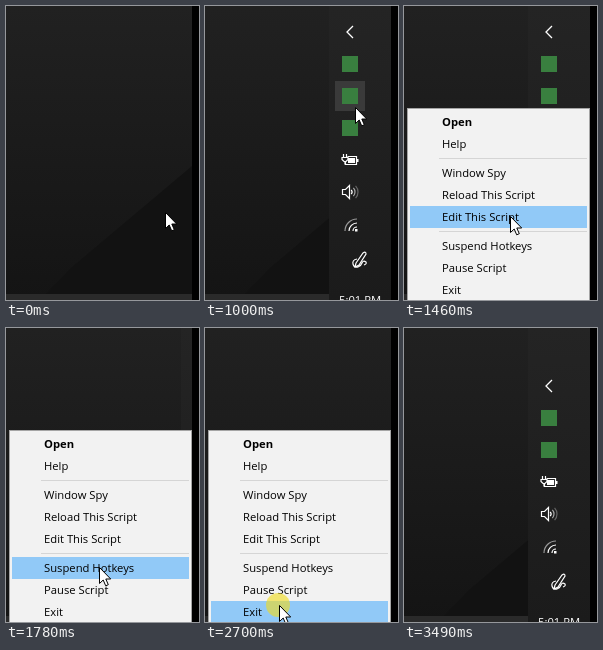
These frames come from a looping animation (193 px wide and 294 px high, 4.65 s). An HTML page with a canvas:

```html
<!DOCTYPE html>
<html>
<head>
<meta charset="utf-8">
<style>
html, body { margin: 0; width: 100%; height: 100%; overflow: hidden; background: #000; }
canvas { display: block; }
</style>
</head>
<body>
<canvas id="stage" width="193" height="294"></canvas>
<script>
const c = document.getElementById('stage').getContext('2d');
const LOOP = 4650, STEP = 77, EDGE = 186, PANEL = 62;
const FONT = '11.25px "Open Sans", "Noto Sans", sans-serif';

// label, top of row
const ROWS = [['Open', 105], ['Help', 127], ['Window Spy', 156], ['Reload This Script', 178],
  ['Edit This Script', 200], ['Suspend Hotkeys', 229], ['Pause Script', 251], ['Exit', 273]];

// time, x, y of the pointer
const POINTER = [[0, 159, 206], [77, 164, 203], [231, 189, 170], [385, 190, 110], [539, 184, 69],
  [770, 150, 101], [1078, 150, 101], [1155, 147, 110], [1309, 118, 180], [1460, 106, 210],
  [1925, 88, 249], [2079, 87, 251], [2464, 74, 277], [2930, 74, 277], [3080, 116, 285],
  [3157, 128, 289], [3234, 140, 300]];

const ramp = (t, from, to) => Math.min(1, Math.max(0, (t - from) / (to - from)));
const smooth = p => p * p * (3 - 2 * p);

function pointerAt(t) {
  const i = POINTER.findIndex(k => k[0] > t);
  if (i < 0) return POINTER[POINTER.length - 1].slice(1);
  const [t0, x0, y0] = POINTER[i - 1], [t1, x1, y1] = POINTER[i];
  const p = smooth(ramp(t, t0, t1));
  return [Math.round(x0 + (x1 - x0) * p), Math.round(y0 + (y1 - y0) * p)];
}

function rect(color, x, y, w, h) {
  c.fillStyle = color;
  c.fillRect(x, y, w, h);
}

function vertical(top, bottom) {
  const g = c.createLinearGradient(0, 0, 0, 294);
  g.addColorStop(0, top);
  g.addColorStop(1, bottom);
  return g;
}

function line(d, color = '#fff', width = 1.2) {
  c.strokeStyle = color;
  c.lineWidth = width;
  c.stroke(new Path2D(d));
}

function fill(d, color = '#fff') {
  c.fillStyle = color;
  c.fill(new Path2D(d));
}

function text(s, x, y, color, weight = '') {
  c.font = weight + ' ' + FONT;
  c.fillStyle = color;
  c.fillText(s, x, y);
}

function arc(x, y, r, from, to, color) {
  c.beginPath();
  c.arc(x, y, r, from, to);
  c.strokeStyle = color;
  c.lineWidth = 1.2;
  c.stroke();
}

function desktop() {
  rect('#000', 0, 0, 193, 294);
  rect(vertical('#212121', '#141414'), 0, 0, EDGE, 294);
  fill('M186 160L65 262L40 288H186Z', '#121212');
  rect('#2a2a2a', 0, 288, EDGE, 6);
}

function panel(shift, closed, hover) {
  if (shift >= PANEL) return;
  c.save();
  c.beginPath();
  c.rect(0, 0, EDGE, 294);
  c.clip();
  c.translate(124 + Math.round(shift), 0);
  rect(vertical('#242424', '#1b1b1b'), 0, 0, PANEL, 294);
  if (hover) rect('#3a3a3a', 6, 75, 30, 30);

  const top = closed ? 58 : 26;
  line(`M24 ${top - 6}l-6 6l6 6`, '#fff', 1.3);
  for (let y = top + 32; y < 130; y += 32) rect('#397f3f', 13, y - 8, 16, 16);

  // battery with plug
  line('M18.5 150.5H27.5V158.5H16.5V156');
  rect('#fff', 19, 152, 7, 5);
  rect('#fff', 28, 153, 1.5, 3);
  line('M14.5 148v3M17.5 148v3M13 151.5h6v2l-2 2h-2l-2-2zM16 155v3.5');

  // speaker
  line('M13.5 183.5h3l4-4v13l-4-4h-3z');
  [['#fff', 3], ['#aaa', 6], ['#666', 9]].forEach(([color, r]) => arc(20, 186, r, -0.75, 0.75, color));

  // wireless
  [['#fff', 4], ['#fff', 8], ['#999', 12]].forEach(([color, r]) =>
    arc(28, 225, r, Math.PI, Math.PI * 1.5, color));
  rect('#fff', 26, 223, 2.5, 2.5);

  // pen
  line('M27 257L34 247q3-2 3 1L30 259l-4 2zM28 253q-5 1-4 5t5 3q3-1 4-4t4-1q1 2-2 3');
  text('5:01 PM', 10, 298, '#fff');
  c.restore();
}

function row(i, hot) {
  const [label, y] = ROWS[i];
  if (hot) rect('#91c9f7', 6, y, 177, 22);
  text(label, 38, y + 15, '#000', i ? '' : 'bold');
}

function menu(py) {
  rect('#a5a5a5', 3, 102, 183, 192);
  rect('#f2f2f2', 4, 103, 181, 191);
  rect('#d5d5d5', 35, 152, 148, 1);
  rect('#d5d5d5', 35, 225, 148, 1);
  ROWS.forEach(([, y], i) => row(i, py >= y && py < y + 22));
}

function pointer(x, y, pressed) {
  if (pressed) {
    c.beginPath();
    c.arc(x - 1, y, 12, 0, 7);
    c.fillStyle = 'rgba(240,220,30,.62)';
    c.fill();
  }
  c.save();
  c.translate(x, y);
  const d = 'M.5 .5V16.5L4.2 13L6.7 18.8L9.3 17.7L6.8 12H11.7Z';
  fill(d);
  line(d, '#000', 1);
  c.restore();
}

function draw(t) {
  const [x, y] = pointerAt(t);
  const open = t >= 1050 && t < 2770;
  let out = 1 - ramp(t, 290, 540);
  out *= out;
  if (t > 1500) out = ramp(t, 1500, 1800) ** 2;
  if (t > 2770) out = (1 - ramp(t, 2805, 3065)) ** 2;

  desktop();
  panel(PANEL * out, t >= 3080, t >= 690 && t < 1050);
  if (open) {
    c.globalAlpha = ramp(t, 1020, 1220);
    menu(y);
  } else if (t >= 2770) {
    c.globalAlpha = 1 - ramp(t, 2770, 2990);
    row(7, true);
  }
  c.globalAlpha = 1;
  pointer(x, y, t >= 920 && t < 1000 || t >= 2610 && t < 2770);
}

function tick() {
  const t = performance.now() % LOOP;
  draw(Math.floor((t + 10) / STEP) * STEP);
  requestAnimationFrame(tick);
}
tick();
</script>
</body>
</html>
```
